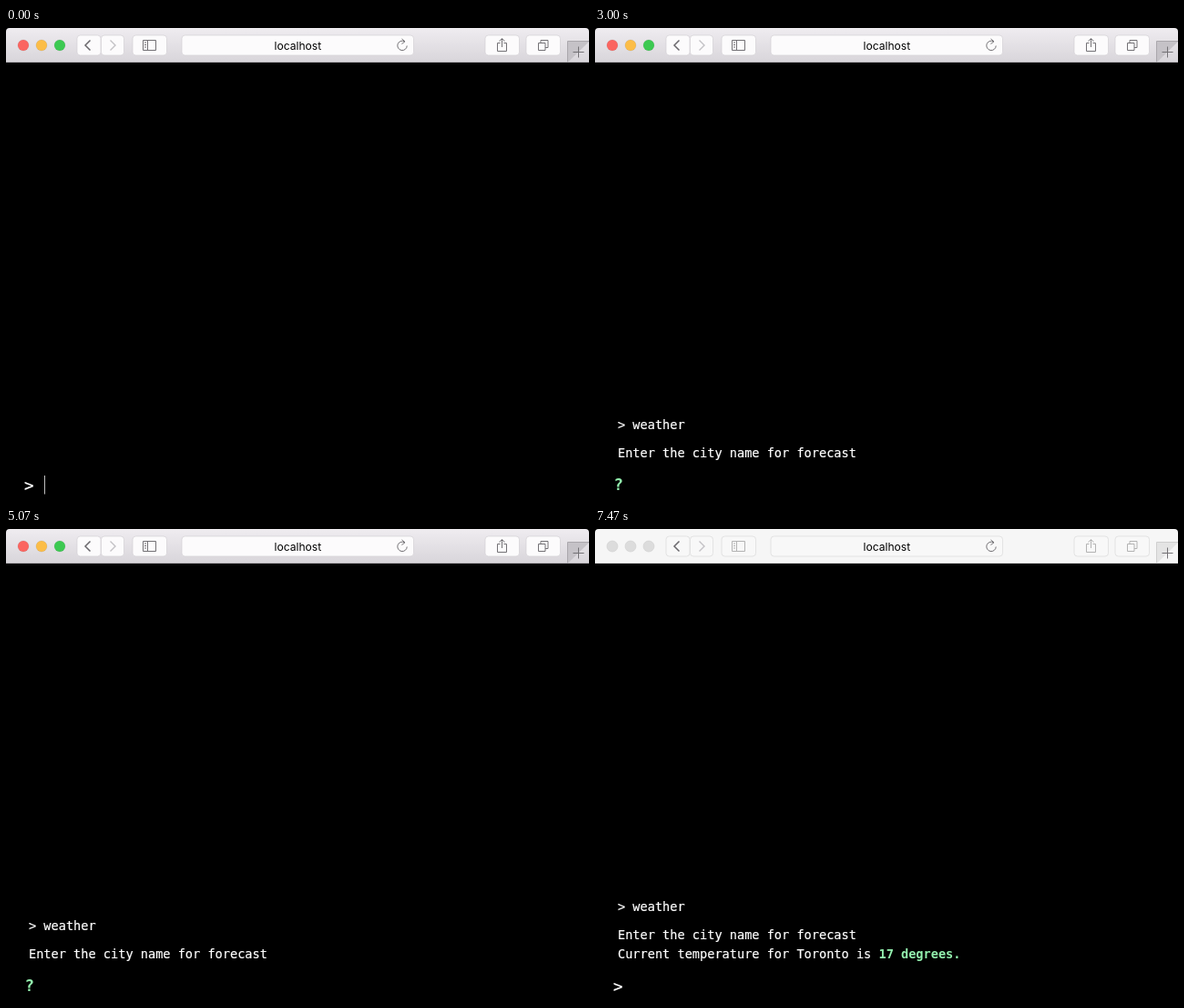
These frames come from a looping animation (640x520 px, 7.59 s). An HTML page:

```html
<!DOCTYPE html>
<html lang="en">
<head>
<meta charset="utf-8">
<title>localhost</title>
<style>
html, body { margin: 0; width: 100%; height: 100%; overflow: hidden; background: #000; }
svg { display: block; }
text { white-space: pre; }
.term { font-family: "DejaVu Sans Mono", monospace; fill: #fff; stroke: #fff; stroke-width: .2; }
.small { font-size: 13.6px; }
.large { font-size: 17.6px; }
.green { fill: #93f0ae; stroke: none; font-weight: bold; }
.btn rect { fill: #fcfbfc; stroke: #d3d0d5; stroke-width: .7; }
.icon { fill: none; stroke: #737175; stroke-width: 1; }
.arrow { stroke: #6a686c; stroke-width: 1.5; }
.light { stroke-width: .6; stroke: rgba(0, 0, 0, .12); }
#bar { fill: url(#shade); }
#edge { stroke: #b4b1b6; }
#tab { fill: #c5c2c7; stroke: #aaa7ac; }
.idle #bar { fill: #f6f6f6; }
.idle #edge { stroke: #d2d2d2; }
.idle #tab { fill: #e4e4e4; stroke: #cfcfcf; }
.idle .light { fill: #dcdcdc; stroke: #cecece; }
.idle .btn rect { fill: #f8f8f8; stroke: #dadada; }
.idle .dim { stroke: #b3b3b3; }
</style>
</head>
<body>
<svg id="stage" width="640" height="520" viewBox="0 0 640 520">
  <defs>
    <linearGradient id="shade" x2="0" y2="1">
      <stop offset="0" stop-color="#efecf0"/>
      <stop offset="1" stop-color="#d8d5da"/>
    </linearGradient>
  </defs>
  <rect width="640" height="520"/>
  <path id="bar" d="M0 38V4Q0 0 4 0H636Q640 0 640 4V38Z"/>
  <path id="edge" d="M0 37.5H640"/>
  <circle class="light" cx="19" cy="19" r="6" fill="#fb6560"/>
  <circle class="light" cx="39" cy="19" r="6" fill="#fcbd47"/>
  <circle class="light" cx="59" cy="19" r="6" fill="#3cc951"/>
  <g class="btn">
    <rect x="78" y="8" width="26" height="22" rx="3.5"/>
    <rect x="104.5" y="8" width="25" height="22" rx="3.5"/>
    <rect x="139" y="8" width="37.5" height="22" rx="3.5"/>
    <rect x="193" y="8" width="254.500" height="22" rx="3.5"/>
    <rect x="526" y="8" width="37.500" height="22" rx="3.5"/>
    <rect x="571" y="8" width="37.500" height="22" rx="3.5"/>
  </g>
  <g class="icon">
    <path class="arrow" d="M92.500 13.500L87 19L92.500 24.500"/>
    <path d="M114.500 13.500L120 19L114.500 24.500" style="stroke:#c3c1c5;stroke-width:1.4"/>
    <path class="dim" d="M150.500 13.500H164.500V24.500H150.500ZM155.500 13.500V24.500M152 16H154M152 18.500H154M152 21H154"/>
    <path d="M437.500 14.800A5.200 5.200 0 1 0 440.200 19.500M434.500 12L438 14.800L434.500 17.500"/>
    <path class="dim" d="M542.500 16.500H539.500V25.500H549.500V16.500H546.500M544.500 21V12M541.500 14.500L544.500 11.500L547.500 14.500"/>
    <path class="dim" d="M584.500 16.500H592V24.500H584.500ZM587 16.500V13.500H595V21.500H592"/>
  </g>
  <path id="tab" d="M640.500 14.500H616.500V38"/>
  <path class="icon" d="M622.500 26.500H634.500M628.500 20.500V32.500"/>
  <text x="320.300" y="23.700" text-anchor="middle" font-family="Inter, sans-serif" font-size="12.100">localhost</text>

  <g class="term small">
    <g id="log">
      <text x="25" y="441">&gt; weather</text>
      <text x="25" y="472">Enter the city name for forecast</text>
    </g>
    <text id="answer" x="25" y="472">Current temperature for Toronto is <tspan class="green">17 degrees.</tspan></text>
  </g>
  <g class="term large">
    <text id="prompt" x="20" y="508.500">&gt;</text>
    <text id="ask" class="green" x="20.500" y="508">?</text>
    <text id="input" x="42" y="508"></text>
  </g>
  <rect id="caret" y="492" width="1" height="20.500" fill="#fff"/>
</svg>
<script>
const LOOP = 7590, ENTER_CMD = 2270, ENTER_CITY = 5000, REPLY = 5200, BLUR = 7470;
const ADVANCE = 17.6 * 0.602;
const el = id => document.getElementById(id);
const show = (id, on) => el(id).style.display = on ? "" : "none";

const entries = [
  { word: "weather", keys: [670, 870, 1070, 1330, 1530, 1670, 1800], end: ENTER_CMD },
  { word: "Toronto", keys: [3530, 3800, 3870, 4000, 4130, 4270, 4270], end: ENTER_CITY }
];

// Caret opacity holds from each time until the next
const caretSteps = [
  [0, .75], [70, .45], [130, .2], [200, 0], [670, 1],
  [2730, .45], [2800, 0], [3270, 1], [4800, 0]
];

function draw(t) {
  const entry = entries.find(e => t < e.end);
  const typed = entry ? entry.word.slice(0, entry.keys.filter(k => k <= t).length) : "";
  const asking = t >= ENTER_CMD && t < REPLY;
  const replied = t >= REPLY;

  el("input").textContent = typed;
  el("caret").setAttribute("x", Math.round(42 + typed.length * ADVANCE));
  el("caret").setAttribute("opacity", caretSteps.filter(s => s[0] <= t).pop()[1]);

  show("log", t >= ENTER_CMD);
  el("log").setAttribute("transform", `translate(0 ${replied ? -21 : 0})`);
  show("answer", replied);
  show("ask", asking);
  show("prompt", !asking);
  el("stage").classList.toggle("idle", t >= BLUR);
}

const start = performance.now();
function tick(now) {
  draw(Math.max(0, now - start) % LOOP);
  requestAnimationFrame(tick);
}
draw(0);
requestAnimationFrame(tick);
</script>
</body>
</html>
```
